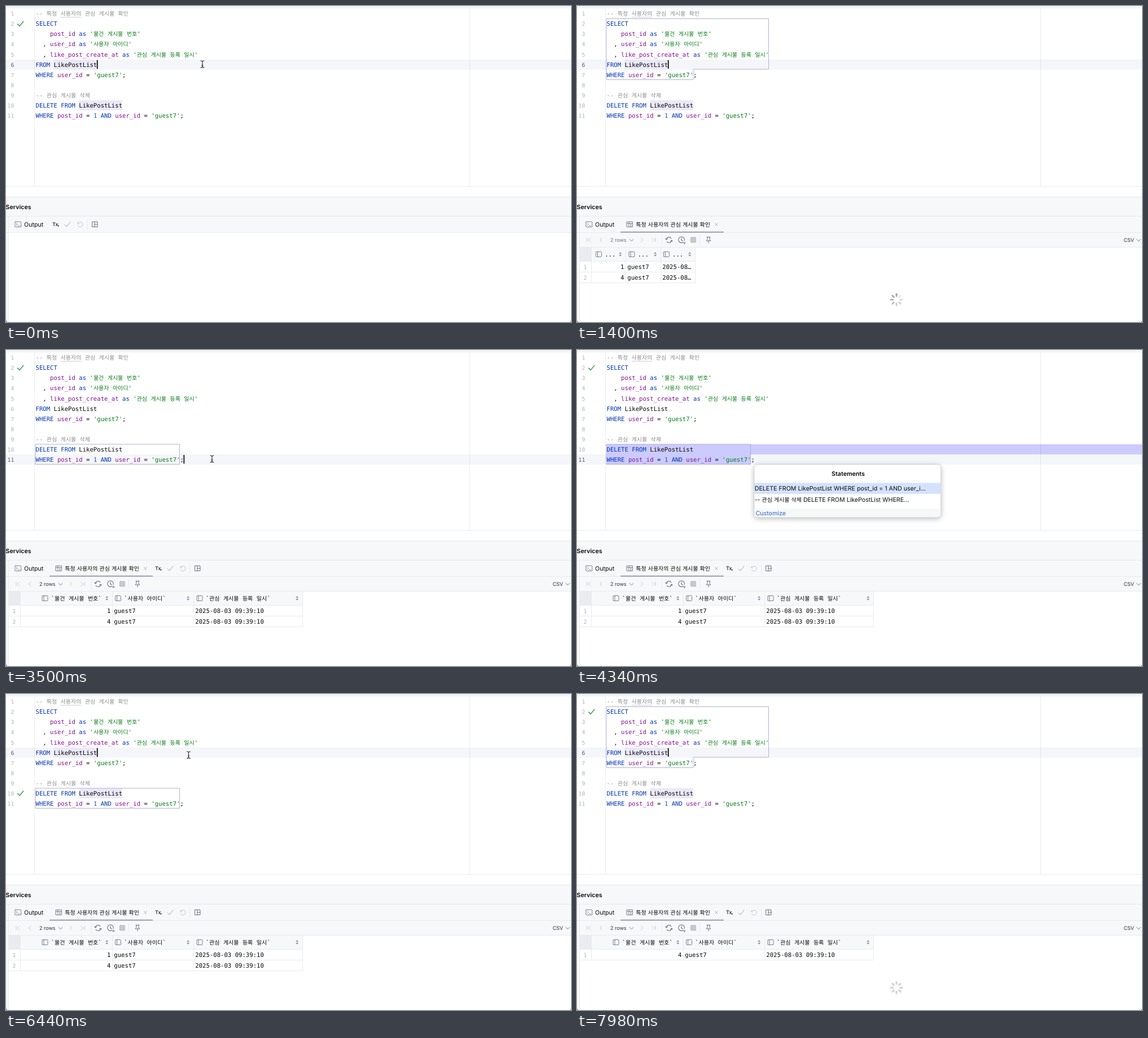
Animation, 1001 px wide and 560 px high, one loop 8 s. Source, as an HTML page:

```html
<!DOCTYPE html>
<html lang="ko">
<head>
<meta charset="utf-8">
<title>SQL console</title>
<style>
  html, body { margin: 0; width: 100%; height: 100%; overflow: hidden; background: #fff; }
  svg { display: block; width: 1001px; height: 560px; }
  text { font: 10.66px Inter, sans-serif; fill: #080808; white-space: pre; text-rendering: geometricPrecision; }
  .mono { font: 10.63px "DejaVu Sans Mono", monospace; }
  .num { font-size: 9.8px; fill: #aeb3c2; text-anchor: end; }
  .now { fill: #5a5d6b; }
  .small { font-size: 9px; fill: #2c2e36; }
  .dim { fill: #6c707e; }
  .bold { font-weight: 600; }
  .ko { font-family: "Noto Sans CJK KR", "Noto Sans CJK JP", sans-serif; font-size: 10px; }
  .kw { fill: #0033b3; } .col { fill: #871094; } .str { fill: #067d17; }
  .int { fill: #1750eb; } .com { fill: #8c8c8c; }
  path { fill: none; stroke: #6c707e; stroke-linecap: round; stroke-linejoin: round; }
  .off { stroke: #c3c6d0; }
  .popup { fill: #fff; stroke: #c5c7d0; stroke-width: .6; filter: drop-shadow(0 2px 5px rgba(0, 0, 0, .28)); }
</style>
</head>
<body>
<svg id="stage" viewBox="0 0 1001 560"></svg>
<script>
const LOOP = 8000, STEP = 70;
const CHAR = 6.4, LEFT = 52.5, PITCH = 18.05;
const PANEL = '#f7f8fa', LINE = '#e9eaee', USER = 'guest7';
const TITLE = '특정 사용자의 관심 게시물 확인';
const CODE = [
  `-- ${TITLE}`,
  'SELECT',
  "    post_id as '물건 게시물 번호'",
  "  , user_id as '사용자 아이디'",
  "  , like_post_create_at as '관심 게시물 등록 일시'",
  'FROM LikePostList',
  `WHERE user_id = '${USER}';`,
  '',
  '-- 관심 게시물 삭제',
  'DELETE FROM LikePostList',
  `WHERE post_id = 1 AND user_id = '${USER}';`,
];
const STATEMENTS = {
  6: { shape: 'M52.5 22.5H339.5V112H206V130.5H52.5Z', fill: 'M52.5 22H1001V112.5H206V130.5H52.5Z',
       popup: [161, 112.5], rows: ["SELECT post_id as '물건 게시물 번호' , user_id as '사용자 아이...",
                                 `-- ${TITLE} SELECT post_id as '물건 게시물 번호'...`] },
  11: { shape: 'M52.5 167H307.5V202.5H52.5Z', fill: 'M52.5 167H1001V185H307.5V203H52.5Z',
        popup: [314, 203], rows: [`DELETE FROM LikePostList WHERE post_id = 1 AND user_i...`,
                                '-- 관심 게시물 삭제 DELETE FROM LikePostList WHERE...'] },
};
const POPUPS = [[840, 1330], [4200, 4900], [7210, 7770]];
const CARET_ON = [[0, 490], [1330, 1890], [2450, 2940], [3150, 4060], [4900, 5740], [6440, 6790], [7770, LOOP]];
// Each visible stretch of the pointer: [time, x, y] stops.
const POINTER = [
  [[0, 348, 103], [840, 348, 103]],
  [[2240, 65, 82.5], [2450, 65, 82.5], [2730, 250, 140], [2940, 441, 200], [3220, 365, 193], [4200, 365, 193]],
  [[5740, 365, 193], [5880, 371, 175], [6090, 338, 81], [6300, 323.5, 108], [7210, 323.5, 108]],
];

const within = (t, spans) => spans.some(([from, to]) => t >= from && t < to);
const rect = (x, y, w, h, fill, more = '') => `<rect x="${x}" y="${y}" width="${w}" height="${h}" fill="${fill}" ${more}/>`;
const path = (d, more = '') => `<path d="${d}" ${more}/>`;
const at = (x, y, body) => `<g transform="translate(${x} ${y})">${body}</g>`;
const text = (x, y, s, cls = '', more = '') =>
  `<text x="${x}" y="${y}" class="${cls}" ${more}>${s.replace(/[가-힣]+/g, '<tspan class="ko">$&</tspan>')}</text>`;
const hline = (y, x = 0, w = 1001) => rect(x, y, w, 1, LINE);
const vline = (x, y, h) => rect(x, y, 1, h, LINE);
const lineTop = n => 4.5 + PITCH * (n - 1);

const TOKEN = /('.*?')|\b(SELECT|FROM|WHERE|DELETE|AND|as)\b|\b([a-z]+_[a-z_]+)\b|\b(\d+)\b/g;
const colorize = s => s.startsWith('--') ? `<tspan class="com">${s}</tspan>` :
  s.replace(TOKEN, (m, str, kw, col) =>
    `<tspan class="${str ? 'str' : kw ? 'kw' : col ? 'col' : 'int'}">${m}</tspan>`);

const tick = (x, y, more) => at(x, y, path('M-5 .5L-1.5 4L5-4', more));
const tableIcon = (x, y) => at(x, y, path('M-5-4.5H5V4.5H-5ZM-5-1.5H5M-1.5-4.5V4.5M2-1.5V4.5', 'stroke-width=".9"'));
const columnIcon = (x, y) => at(x, y, path('M-4-4.5H4Q5-4.5 5-3.5V3.5Q5 4.5 4 4.5H-4Q-5 4.5-5 3.5V-3.5Q-5-4.5-4-4.5ZM-2-4.5V4.5', 'stroke-width=".9"'));
const sortIcon = (x, y) => at(x, y, path('M-1.7-1.5L0-3.3L1.7-1.5ZM-1.7 1.5L0 3.3L1.7 1.5Z', 'style="fill:#6c707e" stroke-width=".5"'));
const chevron = (x, y, turn, more) => `<g transform="translate(${x} ${y}) rotate(${turn})">${path('M-1.6-3.5L1.8 0L-1.6 3.5', more)}</g>`;

function editor(t, line, popupOpen) {
  const outlined = t < 490 ? 0 : t < 3500 || t >= 6790 ? 6 : 11;
  const statement = STATEMENTS[outlined];
  let out = rect(0, lineTop(line), 1001, 18, '#f5f6f9');
  if (line === 6) {
    out += rect(84.5, lineTop(6), 76.8, 18, '#ebe9f8') + rect(129.3, lineTop(10), 76.8, 18, '#ebe9f8');
  }
  if (popupOpen) out += path(statement.fill, 'style="fill:#cbcbff;stroke:none"');
  out += rect(50, 4, 1, 315, 'rgba(0,0,30,.08)') + rect(821, 4, 1, 315, 'rgba(0,0,30,.08)');
  if (statement) out += path(statement.shape, 'style="stroke:#aaa6d4" stroke-width=".9"');
  CODE.forEach((s, i) => {
    const y = 17.3 + PITCH * i;
    out += text(14.3, y, String(i + 1), `mono num ${i + 1 === line ? 'now' : ''}`);
    out += text(LEFT, y, colorize(s), 'mono');
  });
  const waves = 'q1-1.6 2 0t2 0'.repeat(9);
  out += path('M97 20' + waves, 'style="stroke:#b5b5b5" stroke-width=".7"');

  const check = t >= 4900 && t < 7770 ? 10 : within(t, [[1330, 1470], [7770, 7840]]) ? 0 : 2;
  if (check) out += tick(25.7, lineTop(check) + 9, 'style="stroke:#4fa565" stroke-width="1.8"');
  if (within(t, CARET_ON)) {
    const x = LEFT + CHAR * CODE[line - 1].length;
    out += rect(x - .4, lineTop(line) + 1, 1.7, 15.5, '#000');
  }
  return out;
}

function popup(line) {
  const { popup: [x, y], rows } = STATEMENTS[line];
  return at(x, y,
    rect(0, 0, 330.5, 93.5, '#fff', 'rx="6" class="popup"') +
    text(166.5, 20.3, 'Statements', 'bold', 'text-anchor="middle"') +
    rect(0, 32.5, 330.5, 19.5, '#d4e2ff') +
    text(.7, 46, rows[0]) + text(.7, 65.5, rows[1]) +
    path('M.3 78.5H330.2V87.5Q330.2 93.2 324.5 93.2H6Q.3 93.2 .3 87.5Z', 'style="fill:#f7f8fa;stroke:none"') +
    text(2.5, 89.5, 'Customize', '', 'style="fill:#315fbd"'));
}

function pointer(t) {
  const stops = POINTER.find(p => t >= p[0][0] && t < p[p.length - 1][0]);
  if (!stops) return '';
  const i = stops.findIndex(s => s[0] > t), [t0, x0, y0] = stops[i - 1], [t1, x1, y1] = stops[i];
  const k = (t - t0) / (t1 - t0);
  const beam = 'M-3-6Q0-6 0-4Q0-6 3-6M0-4V4M-3 6Q0 6 0 4Q0 6 3 6M-1.3 2H1.3';
  return at(x0 + (x1 - x0) * k, y0 + (y1 - y0) * k, path(beam, 'style="stroke:#222" stroke-width="1.1"'));
}

function spinner(t) {
  if (!within(t, [[1400, 1960], [7840, LOOP]])) return '';
  const head = Math.floor((t - 1400) / 125), even = t >= 7840;
  let bars = '';
  for (let i = 0; i < 8; i++) {
    const age = (head - i + 16 * 8) % 8;
    const shade = even ? .36 : .72 - age * .075;
    bars += rect(-1.5, -11.5, 3, 6.3, '#80828f', `rx="1" opacity="${shade}" transform="rotate(${i * 45})"`);
  }
  return at(566, 520.5, bars);
}

const transactionTools = x => at(x, 387,
  text(0, 3.4, 'Tx', 'small bold') + rect(10, 1.8, 1.8, 1.8, '#2c2e36') +
  tick(27, 0, 'class="off" stroke-width="1.2"') +
  path('M45-4V-1H48M45.3-1.3A4.5 4.5 0 1 1 45.5 2.5', 'class="off"') +
  vline(62, -9, 18) +
  path('M71-4.5H80V4.5H71ZM75-4.5V4.5M75 0H80', 'stroke-width="1"'));

function services(t) {
  const hasResult = t >= 1400;
  let out = rect(0, 338, 1001, 64, PANEL) + rect(0, 402, 5, 158, PANEL) +
    hline(319) + hline(338) + hline(372) + hline(401) + vline(4, 373, 187) +
    text(-.5, 359.8, 'Services', 'bold') +
    at(21.3, 387, path('M-4.5-4.7H4.5Q5.5-4.7 5.5-3.7V3.7Q5.5 4.7 4.5 4.7H-4.5Q-5.5 4.7-5.5 3.7V-3.7Q-5.5-4.7-4.5-4.7ZM-3-2L-1 0L-3 2M.5 2.3H3', 'stroke-width=".9"')) +
    text(32, 390.9, 'Output');
  if (!hasResult) return out + transactionTools(82);
  out += tableIcon(93.5, 387) + text(104.3, 390.9, TITLE) +
    path('M244.5 384.5l5 5m0-5l-5 5', 'style="stroke:#a3a6b1" stroke-width=".8"') +
    rect(77, 399.7, 183, 2, '#9da0a8');
  if (t >= 1470) out += transactionTools(264);
  return out + resultToolbar(t) + resultTable(t) + spinner(t);
}

function resultToolbar(t) {
  const light = 'class="off"';
  return rect(5, 402, 996, 25, PANEL) + hline(427, 5, 996) +
    path('M18 411V418', light) + chevron(22.5, 414.6, 180, light) + chevron(42.5, 414.6, 180, light) +
    text(59, 418, '2 rows', t < 1470 ? 'small dim' : 'small') + chevron(96.5, 415, 90, 'stroke-width=".9"') +
    chevron(115, 414.6, 0, light) + chevron(134.5, 414.6, 0, light) + path('M139 411V418', light) +
    vline(150, 406, 18) +
    at(163, 414.6, path('M-4.8-1A5 5 0 0 1 4-3M4.8 1A5 5 0 0 1-4 3M-6.3-2.5L-4.8-.6L-2.8-2M6.3 2.5L4.8.6L2.8 2', 'stroke-width="1.1"')) +
    at(185, 414.6, path('M3.5 3.7A5.3 5.3 0 1 1 5.2 1M0-3V.3L2.4 1.5', 'stroke-width="1.1"') + path('M6.5 3.5V6.5H3.5Z', 'style="fill:#6c707e" stroke-width=".3"')) +
    rect(201.5, 410, 9, 9, '#c8c9ce', 'rx="1" stroke="#b0b1b7" stroke-width=".8"') +
    vline(217, 406, 18) +
    at(233, 414.6, path('M-3-5H3M-2-5V-1L-4 1.5H4L2-1V-5M0 1.5V5.5')) +
    text(968.5, 418, 'CSV', 'small') + chevron(995, 415, 90, 'stroke-width=".9"');
}

function resultTable(t) {
  const wide = t >= 1470;
  const edges = wide ? [25, 188, 332, 525] : [25, 86, 148, 209];
  const icons = wide ? [69, 198.5, 343] : [38.5, 97, 158.3];
  const names = wide ? ['`물건 게시물 번호`', '`사용자 아이디`', '`관심 게시물 등록 일시`'] : ['...', '...', '...'];
  const date = wide ? '2025-08-03 09:39:10' : '2025-08…';
  const ids = t >= 7840 ? ['4'] : ['1', '4'];
  const bottom = 452 + 19 * ids.length, right = edges[3];
  let out = rect(5, 428, right - 5, 24, PANEL) + rect(5, 428, 20, 24, '#ebecf0') + hline(452, 5, right - 4);
  edges.forEach(x => out += vline(x, 428, bottom - 428));
  names.forEach((name, i) => {
    out += columnIcon(icons[i], 440) + text(icons[i] + 10.7, 444, name, 'mono') + sortIcon(edges[i + 1] - 9.3, 440);
  });
  ids.forEach((id, i) => {
    const y = 465.8 + 19 * i;
    out += hline(471 + 19 * i, 5, right - 4) +
      text(17.3, y, String(i + 1), 'mono num') +
      text(edges[1] - 2.7, y, id, 'mono', 'text-anchor="end"') +
      text(edges[1] + 3.3, y, USER, 'mono') + text(edges[2] + 3.3, y, date, 'mono');
  });
  return out;
}

function scene(t) {
  const line = t >= 3150 && t < 6440 ? 11 : 6;
  const popupOpen = within(t, POPUPS);
  return rect(0, 0, 1001, 560, '#fff') + rect(0, 0, 1001, 3, PANEL) + hline(3) +
    editor(t, line, popupOpen) + services(t) +
    (popupOpen ? popup(line) : '') + pointer(t) +
    path('M0 557V560H2ZM1001 558V560H999Z', 'style="fill:#777;stroke:none"');
}

const stage = document.getElementById('stage');
let shown = -1;
function play(now) {
  const step = Math.floor(now % LOOP / STEP);
  if (step !== shown) stage.innerHTML = scene(step * STEP);
  shown = step;
  requestAnimationFrame(play);
}
play(0);
</script>
</body>
</html>
```
